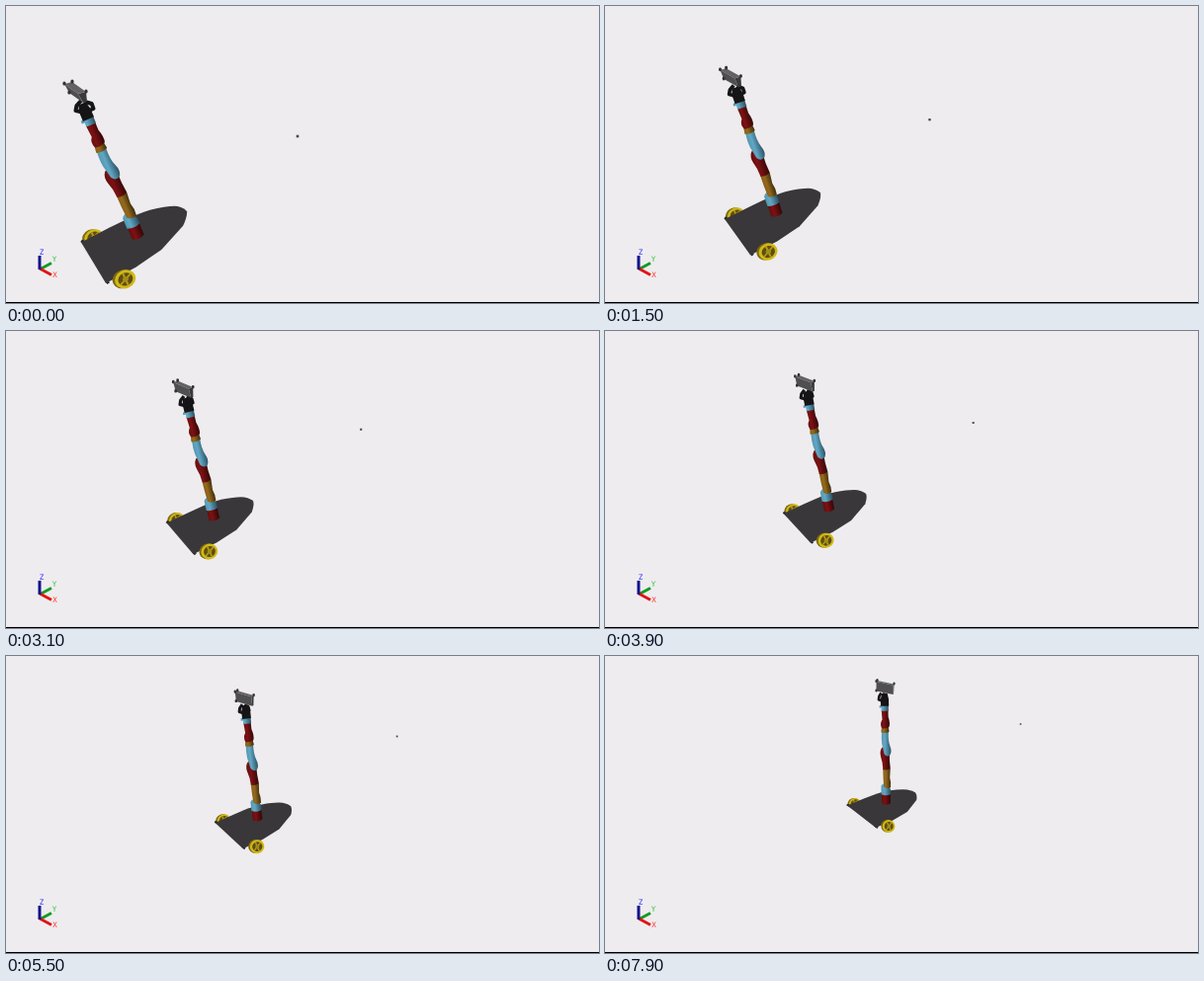
These frames come from a looping animation (600 px wide and 301 px high, 8 s). An HTML page:

```html
<!DOCTYPE html>
<html lang="en">
<head>
<meta charset="utf-8">
<title>Mobile robot arm</title>
<style>
  html, body { margin: 0; width: 100%; height: 100%; overflow: hidden; background: #eeecee; }
  svg { display: block; width: 600px; height: 301px; }
  text { font: 7.5px "DejaVu Sans Mono", monospace; text-anchor: middle; }
</style>
</head>
<body>
<svg viewBox="0 0 600 301">
  <defs>
    <linearGradient id="red"><stop offset="0" stop-color="#650d0f"/><stop offset=".35" stop-color="#7d1113"/><stop offset="1" stop-color="#330708"/></linearGradient>
    <linearGradient id="blue"><stop offset="0" stop-color="#5597b2"/><stop offset=".35" stop-color="#61a8c4"/><stop offset="1" stop-color="#2c5164"/></linearGradient>
    <linearGradient id="gold"><stop offset="0" stop-color="#85601a"/><stop offset=".35" stop-color="#94691c"/><stop offset="1" stop-color="#3d2c0b"/></linearGradient>
    <g id="wheel">
      <ellipse cx="-.14" cy="-.08" rx=".92" ry=".94" fill="#7b6a12"/>
      <ellipse cx=".06" cy=".04" rx=".93" ry=".94" fill="#d2b817"/>
      <ellipse cx=".08" cy=".05" rx=".66" ry=".66" fill="#5d4e12"/>
      <path d="M.08-.6V.68M-.5.36.66-.25" stroke="#b59c18" stroke-width=".18"/>
      <circle cx=".08" cy=".05" r=".26" fill="#a38d17"/>
    </g>
  </defs>
  <rect width="600" height="301" fill="#eeecee"/>
  <rect y="300" width="600" height="1"/>

  <g fill="none" stroke-width="3">
    <path d="M34 267 46 260.500" stroke="#149a22"/>
    <path d="M34 266 46 272.500" stroke="#e01414"/>
    <path d="M34 267V253" stroke="#12128c"/>
  </g>
  <text x="36" y="251.500" fill="#2a2aff">Z</text>
  <text x="49" y="259" fill="#2fc43c">Y</text>
  <text x="49.500" y="275" fill="#ff3030">X</text>

  <rect id="dot" fill="#4a484a"/>
  <use id="rear" href="#wheel"/>
  <path id="axle" stroke="#242324" fill="none"/>
  <path id="plate" fill="#393739"/>
  <use id="front" href="#wheel"/>

  <g id="arm">
    <path d="M-6.500-14V-1Q0 3 6.500-1V-14Z" fill="url(#red)"/>
    <path d="M-7-13Q0-10 7-13L7-19 3-26Q-4-30-7-24Z" fill="url(#blue)"/>
    <path d="M-3-23Q2-19 7-22 8-29 6-35L7-47H-4Q-4-34-3-23Z" fill="url(#gold)"/>
    <path d="M-4-46Q2-44 7-47L6-58 6-68Q2-78-5-75-9-70-7-63Q-4-55-4-46Z" fill="url(#red)"/>
    <path d="M-2-67Q2-61 7-65 10-70 7-77Q4-84 5-97H-5Q-6-87-5-80Z" fill="url(#blue)"/>
    <path d="M-6-95.500Q0-93 6-96L5-103H-5Z" fill="url(#gold)"/>
    <path d="M-5-101Q-8-107-4-112L-5-125H5L5-116Q8-107 6-102Q0-99-5-101Z" fill="url(#red)"/>
    <path d="M-5-123.500H5.500V-131H-8V-128H-5Z" fill="url(#blue)"/>
    <path d="M-6-130H6V-139L4-147H-4L-6-139Z" fill="#151416"/>
  </g>
  <path id="grip" fill="none" stroke="#151416" stroke-linejoin="round"/>
  <path id="side" fill="#3a393b"/>
  <path id="lid" fill="#626163"/>
  <path id="box" fill="#4f4e50"/>
  <path id="knobs" stroke="#333235" stroke-linecap="round"/>
</svg>
<script>
const LOOP = 8000, STEP = 100, TRAVEL = 7900;

// Each part glides straight from its near place to its far place.
const path = {
  foot: [[134, 235], [284.5, 150]],
  hand: [[81.5, 110], [283, 47]],
  left: [[76, 239.5], [245, 151.5]],
  corner: [[101, 281], [274, 174]],
  tip: [[182, 206.5], [313, 137.5]],
  dot: [[295, 132], [420.5, 69]],
  head: [[68.5, 88.5], [283, 32.5]],
  across: [[14, 10], [17, 3.5]],
  down: [[5, 9], [0, 9.5]],
  depth: [[8, -2], [1, -1]]
};

const ease = u => u + u * (1 - u) / 2;
const mix = (a, b, k) => a + (b - a) * k;

const $ = id => document.getElementById(id);
const set = (id, attrs) => {
  for (const name in attrs) $(id).setAttribute(name, attrs[name]);
};
const add = (p, v, k = 1) => [p[0] + v[0] * k, p[1] + v[1] * k];
const sub = (p, q) => add(p, q, -1);
const pt = p => p.map(n => n.toFixed(2)).join(" ");
const poly = (...points) => "M" + points.map(pt).join("L") + "Z";

function drawWheel(id, center, rx, ry) {
  set(id, { transform: `translate(${pt(center)}) rotate(-25) scale(${rx} ${ry})` });
}

// u runs across the back edge of the plate, v towards its tip.
function drawBase(p, far) {
  const back = sub(p.corner, p.left);
  const ahead = sub(p.tip, add(p.left, back, .5));
  const place = (u, v) => add(add(p.left, back, u), ahead, v);
  const at = (u, v) => pt(place(u, v));
  set("plate", { d: `M${at(0, 0)}L${at(.03, .3)}L${at(.05, .45)}Q${at(.08, .62)} ${at(.13, .71)}
    Q${at(.24, .88)} ${at(.35, .95)}Q${at(.46, 1)} ${at(.54, 1)}Q${at(.64, .98)} ${at(.76, .9)}
    L${at(.97, .61)}L${at(1.02, .32)}L${at(1, 0)}Z` });
  set("axle", { d: `M${at(-.03, .01)}L${at(.08, .03)}M${at(.92, .02)}L${at(1.03, .02)}`, "stroke-width": 3 * p.scale });
  drawWheel("rear", place(.03, .12), mix(10.5, 6.3, far), mix(8.2, 5.4, far));
  drawWheel("front", place(1.12, .17), mix(11.6, 6.8, far), mix(9.8, 6.8, far));
}

function drawArm(p, far) {
  const [x, y] = sub(p.hand, p.foot);
  const angle = Math.atan2(x, -y) * 180 / Math.PI;
  set("arm", { transform: `translate(${pt(p.foot)}) rotate(${angle}) scale(${p.scale} ${Math.hypot(x, y) / 135})` });
  const spread = mix(9, 4, far);
  const claw = (u, v) => pt(add(p.hand, [u * spread - 2, v * p.scale]));
  set("grip", {
    d: `M${claw(0, -2)}L${claw(-1, -4)}L${claw(-.9, -9)}L${claw(-.4, -14)}
      M${claw(0, -2)}L${claw(1, -6)}L${claw(.8, -11)}L${claw(0, -13)}`,
    "stroke-width": 4 * p.scale
  });
}

function drawHead(p) {
  const topLeft = add(add(p.head, p.across, -.5), p.down, -.5);
  const topRight = add(topLeft, p.across);
  const lowLeft = add(topLeft, p.down);
  const lowRight = add(topRight, p.down);
  const backLeft = add(topLeft, p.depth);
  const backRight = add(topRight, p.depth);
  set("box", { d: poly(topLeft, topRight, lowRight, lowLeft) });
  set("lid", { d: poly(topLeft, backLeft, backRight, topRight) });
  set("side", { d: poly(topRight, backRight, add(lowRight, p.depth, .5), lowRight) });
  set("knobs", {
    d: [topLeft, backLeft, backRight, lowLeft].map(q => `M${pt(q)}v-.8`).join(""),
    "stroke-width": 3.2 * p.scale
  });
}

function render(ms) {
  const t = Math.floor(ms % LOOP / STEP) * STEP;
  const far = ease(t / TRAVEL);
  const p = { scale: mix(1, .68, far) };
  for (const name in path) {
    const [from, to] = path[name];
    p[name] = add(from, sub(to, from), far);
  }
  const size = mix(2.6, 1.6, far);
  set("dot", { x: p.dot[0] - size / 2, y: p.dot[1] - size / 2, width: size, height: size });
  drawBase(p, far);
  drawArm(p, far);
  drawHead(p);
}

const start = performance.now();
function tick() {
  render(performance.now() - start);
  requestAnimationFrame(tick);
}
tick();
</script>
</body>
</html>
```
